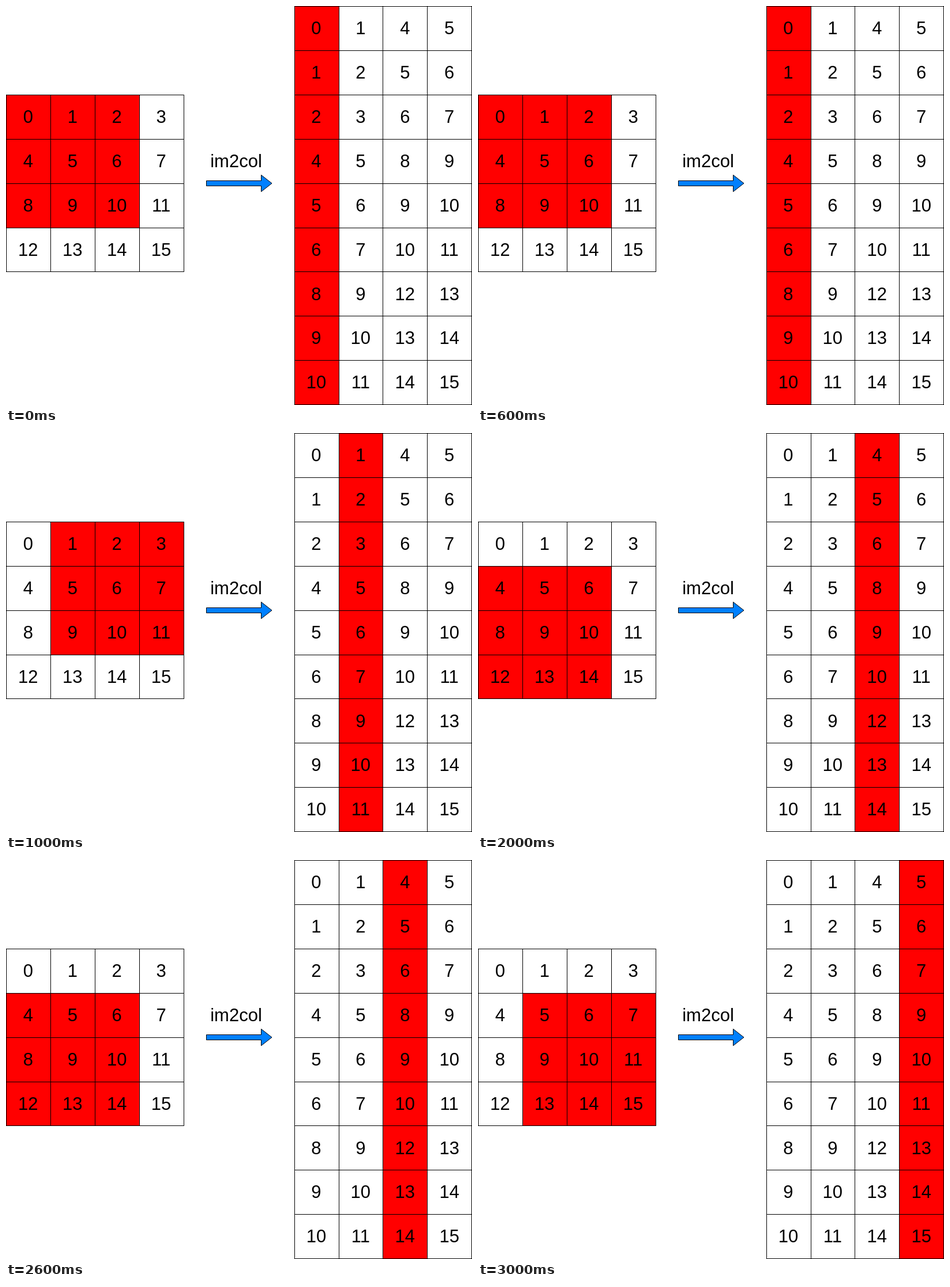
An HTML page that plays this animation: 808x693 px, repeating every 4000 ms.

```html
<!DOCTYPE html>
<html lang="en">
<head>
<meta charset="utf-8">
<title>im2col</title>
<style>
  html, body { margin: 0; width: 100%; height: 100%; overflow: hidden; background: #fff; }
  svg { display: block; }
  text { font: 31px "Liberation Sans", Arial, sans-serif; text-anchor: middle; fill: #000; }
  .cell { fill: #fff; }
  .cell.on { fill: #f00; }
  .line { fill: #000; }
  .cell, .line { shape-rendering: crispEdges; }
</style>
</head>
<body>
<svg id="stage" width="808" height="693" viewBox="0 0 808 693">
  <path d="M347.5 303.5H442.5V293.5L461 308L442.5 322.5V312.5H347.5Z" fill="#0080ff" stroke="#000"/>
  <text x="399" y="280">im2col</text>
</svg>
<script>
const PITCH = 76.9, STEP = 1000, STEPS = 4;
const stage = document.getElementById("stage");
const cells = [];

function add(tag, attrs, content) {
  const el = document.createElementNS("http://www.w3.org/2000/svg", tag);
  for (const key in attrs) el.setAttribute(key, attrs[key]);
  if (content !== undefined) el.textContent = content;
  return stage.appendChild(el);
}

// value(row, col) gives the number, active(row, col, step) the highlight
function grid(left, top, rows, cols, value, active) {
  const x = i => Math.round(left + i * PITCH);
  const y = i => Math.round(top + i * PITCH);
  for (let r = 0; r < rows; r++) {
    for (let c = 0; c < cols; c++) {
      const el = add("rect", {
        class: "cell", x: x(c), y: y(r),
        width: x(c + 1) - x(c), height: y(r + 1) - y(r)
      });
      cells.push({ el, active: step => active(r, c, step) });
      add("text", {
        x: left + (c + 0.5) * PITCH - 0.1,
        y: Math.round(top + (r + 0.5) * PITCH + 10.7)
      }, value(r, c));
    }
  }
  const width = x(cols) - x(0) + 1, height = y(rows) - y(0) + 1;
  for (let r = 0; r <= rows; r++) add("rect", { class: "line", x: x(0), y: y(r), width, height: 1 });
  for (let c = 0; c <= cols; c++) add("rect", { class: "line", x: x(c), y: y(0), width: 1, height });
}

const inPatch = (i, start) => i >= start && i < start + 3;

grid(0, 2 * PITCH, 4, 4,
  (r, c) => r * 4 + c,
  (r, c, step) => inPatch(r, step >> 1) && inPatch(c, step & 1));

grid(499.6, 0, 9, 4,
  (r, c) => ((c >> 1) + Math.floor(r / 3)) * 4 + (c & 1) + r % 3,
  (r, c, step) => c === step);

let shown = -1;
function show(step) {
  if (step === shown) return;
  shown = step;
  for (const cell of cells) cell.el.classList.toggle("on", cell.active(step));
}

const start = performance.now();
function tick() {
  show(Math.floor((performance.now() - start) / STEP) % STEPS);
  requestAnimationFrame(tick);
}
tick();
</script>
</body>
</html>
```
